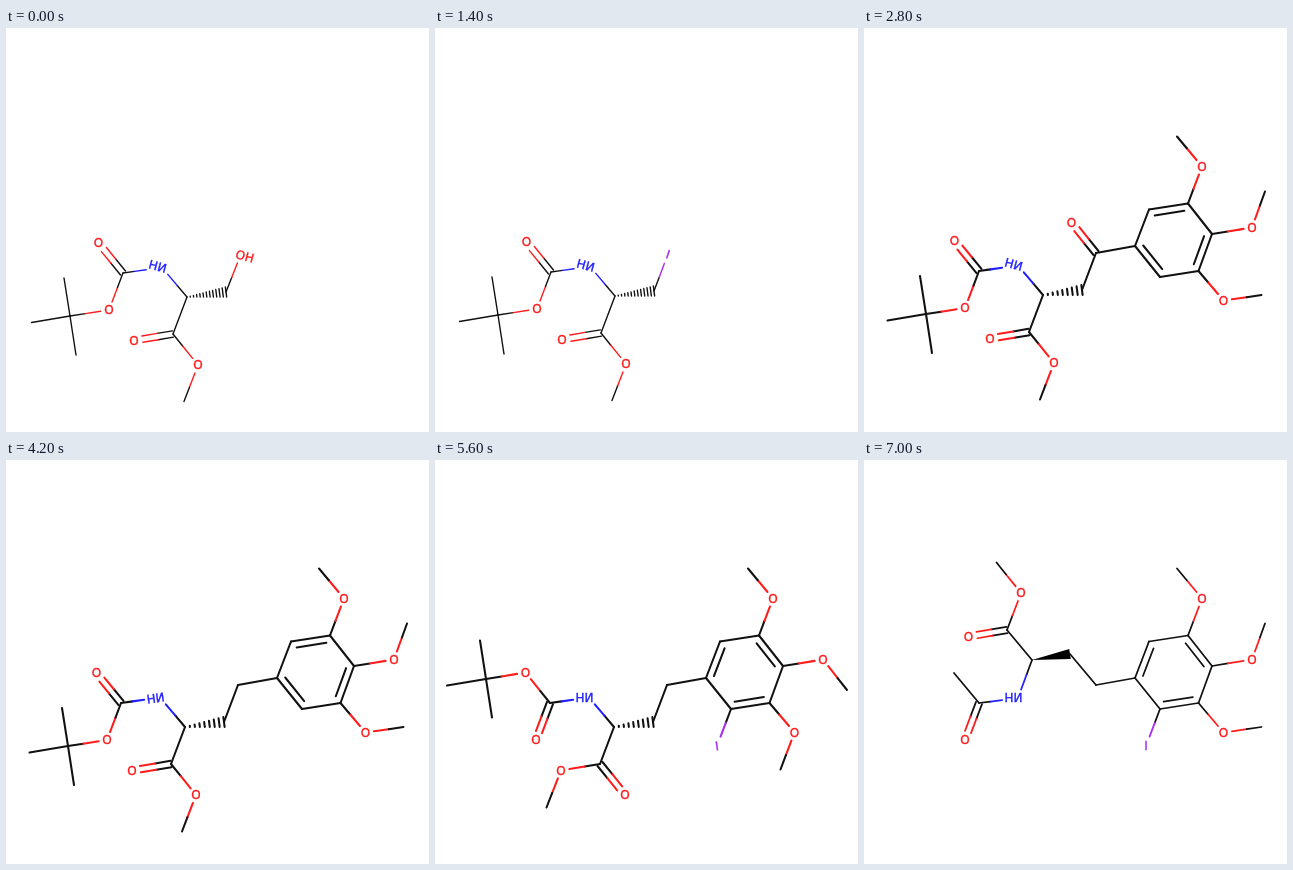
Recreate the animation shown at these times as an HTML page. Size 423 px wide and 404 px high, loop 8000 ms.

```html
<!DOCTYPE html>
<html lang="en">
<head>
<meta charset="utf-8">
<title>Synthesis steps</title>
<style>
html, body { margin: 0; width: 100%; height: 100%; overflow: hidden; background: #fff; }
svg { display: block; }
text { font: 12px "DejaVu Sans", sans-serif; stroke-width: .35px; }
</style>
</head>
<body>
<svg id="stage" width="423" height="404" viewBox="0 0 423 404"></svg>
<script>
const LOOP = 8000, STEP = 1400;
const COLORS = { O: '#ff1c1c', N: '#2020ff', I: '#a52cf0' };
const TRIM = { O: 8.5, N: 9, I: 10 };

// Atom names start with the element; anything but O, N, I is an unlabelled carbon.
const core = {
  q: [62, 286], q1: [23.5, 292.5], q2: [56, 248], q3: [68, 325], Oq: [101, 280],
  c: [115, 243], Oc: [90.5, 213], N: [154, 237.5], a: [179, 267], b: [218, 262],
  e: [165, 304], Od: [126, 310.5], Oe: [190, 335], me: [176, 371.5]
};
const aryl = {
  k: [232, 225], r1: [271, 218], r2: [285, 181.5], r3: [324, 175.5],
  r4: [348, 206], r5: [334.5, 243], r6: [296, 249],
  Ox: [338, 138.5], mx: [313, 108.5], Oy: [388, 199.5], my: [401, 163.5],
  Oz: [359.5, 272.5], mz: [397.5, 267]
};
const iodoaryl = { ...aryl, I: [282, 286] };
const turned = {
  q: [51, 219], q1: [12, 225.5], q2: [45, 180.5], q3: [57, 257.5], Oq: [90.5, 212.5], Oc: [101, 280],
  Od: [190, 335], Oe: [126, 310.5], me: [111.5, 347.5], my: [412, 230], mz: [345.5, 309.5]
};
const acetyl = {
  c: [115, 243], m: [90, 213], Oc: [101, 280], N: [154, 238], a: [168, 200], b: [206, 194],
  e: [143, 170], Od: [104.5, 176.5], Oe: [157, 133], me: [132.5, 102.5]
};

// Bonds: - single, = double, : ring double, # hashed wedge, > solid wedge
const ester = ' a-e e=Od e-Oe Oe-me c=Oc c-N a-N';
const coreBonds = 'q-q1 q-q2 q-q3 q-Oq Oq-c a#b' + ester;
const methoxy = ' b-k k-r1 r3-Ox Ox-mx r4-Oy Oy-my r5-Oz Oz-mz';
const ringA = methoxy + ' r1-r2 r2:r3 r3-r4 r4:r5 r5-r6 r6:r1';
const ringB = methoxy + ' r1:r2 r2-r3 r3:r4 r4-r5 r5:r6 r6-r1 r6-I';

const shift = (atoms, d) =>
  Object.fromEntries(Object.entries(atoms).map(([k, [x, y]]) => [k, [x + d, y + d]]));

// Line weight, edge softness and hash count of each drawing style
const fine = { width: 1.4, blur: .25, hashes: 12 };
const bold = { width: 2.05, blur: .5, hashes: 8 };
const medium = { width: 1.75, blur: .35 };

const scenes = [
  { ...fine, atoms: { ...shift(core, 2), Oh: [234.5, 227] }, bonds: coreBonds + ' b-Oh', tilt: 15 },
  { ...fine, atoms: { ...shift(core, 1), I: [233, 226] }, bonds: coreBonds + ' b-I', tilt: 15, iTilt: 18 },
  { ...bold, atoms: { ...core, ...aryl, Ok: [207.5, 194.5] }, bonds: coreBonds + ringA + ' k=Ok', tilt: 15 },
  { ...bold, atoms: { ...core, ...aryl }, bonds: coreBonds + ringA, tilt: -8 },
  { ...bold, atoms: { ...core, ...iodoaryl, ...turned }, bonds: coreBonds + ringB, tilt: 0, iTilt: -8 },
  { ...medium, atoms: { ...acetyl, ...iodoaryl }, bonds: 'c-m a>b' + ester + ringB, tilt: 0 }
];

const mix = (p, q, t) => [p[0] + (q[0] - p[0]) * t, p[1] + (q[1] - p[1]) * t];
const colorOf = name => COLORS[name[0]] || '#111';
const line = (p, q, color) => `<path d="M${p}L${q}" stroke="${color}"/>`;

function bond(scene, code) {
  const [, m, kind, n] = code.match(/(\w+)(\W)(\w+)/);
  const p = scene.atoms[m], q = scene.atoms[n];
  const dx = q[0] - p[0], dy = q[1] - p[1], len = Math.hypot(dx, dy);
  const side = (pt, d) => [pt[0] - dy / len * d, pt[1] + dx / len * d];
  if (kind === '>') return `<path d="M${p}L${side(q, 5)}L${side(q, -5)}Z" fill="#000"/>`;
  if (kind === '#') {
    let out = '';
    for (let i = 1; i <= scene.hashes; i++) {
      const t = i / scene.hashes, pt = mix(p, q, t);
      out += line(side(pt, 5 * t), side(pt, -5 * t), '#111');
    }
    return out;
  }
  // The hydrogen sits left of N, so bonds arriving from the left stop earlier.
  const trim = (name, fromLeft) => name === 'N' && fromLeft ? 16 : TRIM[name[0]] || 0;
  const start = mix(p, q, trim(m, false) / len);
  const end = mix(p, q, 1 - trim(n, dx > 30) / len);
  const stroke = (d, inset = 0) => {
    const s = side(mix(start, end, inset), d), e = side(mix(start, end, 1 - inset), d);
    const mid = mix(s, e, .5);
    return colorOf(m) === colorOf(n) ? line(s, e, colorOf(m))
      : line(s, mid, colorOf(m)) + line(mid, e, colorOf(n));
  };
  if (kind === '=') return stroke(3.2) + stroke(-3.2);
  return stroke(0) + (kind === ':' ? stroke(6.7, .12) : '');
}

function label(scene, name) {
  const element = name[0], color = COLORS[element];
  if (!color) return '';
  const word = name === 'N' ? 'NH' : name === 'Oh' ? 'OH' : element;
  const angle = element === 'I' ? scene.iTilt || 0 : element === 'N' || name === 'Oh' ? scene.tilt : 0;
  const x = { O: -4.7, N: -4.5, I: -1.8 }[element];
  const mirror = element === 'N' ? ' scale(-1 1)' : '';
  return `<text x="${x}" y="4.4" fill="${color}" stroke="${color}" transform="translate(${scene.atoms[name]}) rotate(${angle})${mirror}">${word}</text>`;
}

const stage = document.getElementById('stage');
stage.innerHTML = scenes.map(s =>
  `<g style="filter: blur(${s.blur}px)"><g fill="none" stroke-width="${s.width}" stroke-linecap="round">` +
  s.bonds.split(' ').map(code => bond(s, code)).join('') + '</g>' +
  Object.keys(s.atoms).map(name => label(s, name)).join('') + '</g>').join('');
const groups = [...stage.children];

const origin = performance.now();
function frame() {
  const t = (performance.now() - origin) % LOOP;
  const current = Math.floor(t / STEP);
  groups.forEach((g, i) => g.style.display = i === current ? '' : 'none');
  requestAnimationFrame(frame);
}
frame();
</script>
</body>
</html>
```
